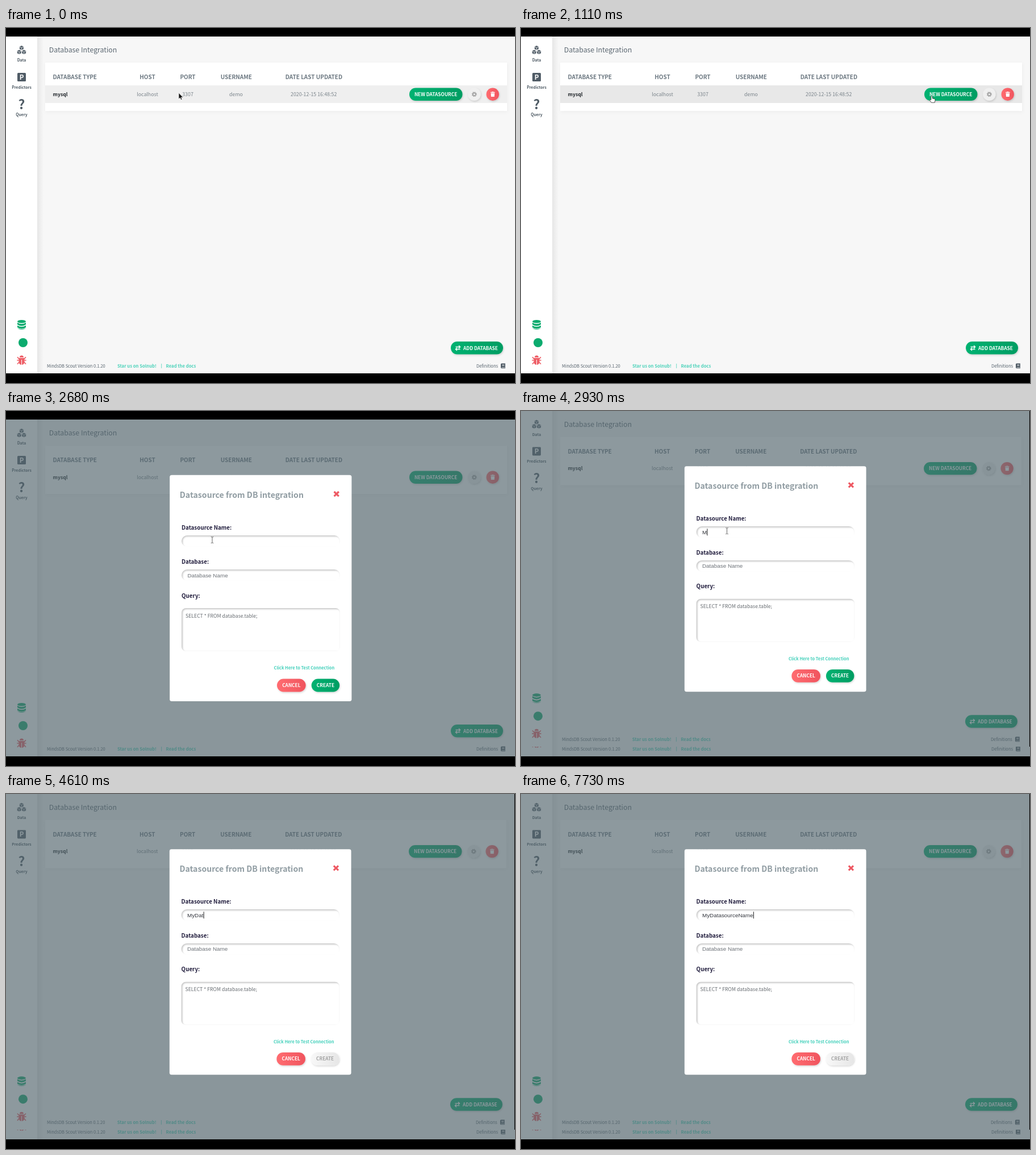
These frames come from a looping animation (896 px wide and 625 px high, 8 s). An HTML page:

```html
<!DOCTYPE html>
<html lang="en">
<head>
<meta charset="utf-8">
<title>Database Integration</title>
<style>
  html, body { margin: 0; width: 100%; height: 100%; overflow: hidden; background: #000; }
  svg { display: block; width: 896px; height: 625px; }
  text { font-family: "Noto Sans CJK SC", "Noto Sans CJK JP", "Noto Sans CJK", sans-serif; white-space: pre; }
  .b { font-weight: 700; }
  .mid { text-anchor: middle; }
  .head { font-size: 10px; fill: #6b7780; }
  .cell { font-size: 8.8px; fill: #7b848b; }
  .nav { font-size: 6.8px; fill: #4c5862; }
  .foot { font-size: 7.5px; fill: #57636d; }
  .link { font-size: 7.7px; fill: #4fd3bb; }
  .btn { font-size: 8.3px; fill: #fff; }
  .label { font-size: 9.83px; fill: #211d3d; }
  .field { font-family: "Liberation Sans", Arial, sans-serif; font-size: 9.87px; }
  .icon { fill: #505c66; }
</style>
</head>
<body>
<svg viewBox="0 0 896 625">
  <defs>
    <linearGradient id="green"><stop stop-color="#00b271"/><stop offset="1" stop-color="#009d63"/></linearGradient>
    <linearGradient id="red"><stop stop-color="#ff6c70"/><stop offset="1" stop-color="#f0555f"/></linearGradient>
    <linearGradient id="grey"><stop stop-color="#f8f8f8"/><stop offset="1" stop-color="#e6e6e6"/></linearGradient>
    <linearGradient id="side"><stop stop-color="#e6e6e6"/><stop offset="1" stop-color="#f7f7f7"/></linearGradient>
    <filter id="blur" x="-20%" y="-50%" width="140%" height="200%"><feGaussianBlur stdDeviation="1.5"/></filter>
    <filter id="drop" x="-20%" y="-40%" width="150%" height="200%">
      <feDropShadow dx="1" dy="1.5" stdDeviation="1.5" flood-color="#000" flood-opacity=".17"/>
    </filter>
    <filter id="soft" x="-5%" y="-20%" width="110%" height="150%">
      <feDropShadow dx="1" dy="2" stdDeviation="3" flood-color="#000" flood-opacity=".04"/>
    </filter>
    <clipPath id="stage"><rect y="15" width="896" height="593"/></clipPath>
    <clipPath id="strip"><rect y="591" width="896" height="17"/></clipPath>
    <clipPath id="nameBox"><rect x="309" y="219" width="279" height="20" rx="10"/></clipPath>
    <clipPath id="dbBox"><rect x="309" y="279" width="279" height="20" rx="10"/></clipPath>
    <clipPath id="queryBox"><rect x="309" y="347" width="279" height="76" rx="8"/></clipPath>
    <path id="cube" d="M0-4.4L3.8-2.6V2L0 4L-3.8 2V-2.6Z"/>
  </defs>

  <rect width="896" height="625"/>

  <g id="shift">
    <g id="page" clip-path="url(#stage)">
      <rect y="15" width="896" height="593" fill="#f7f7f7"/>
      <rect x="55" y="15" width="11" height="593" fill="url(#side)"/>
      <rect y="15" width="55" height="593" fill="#fff"/>

      <!-- side bar -->
      <g class="icon" stroke="#fff" stroke-width=".7">
        <use href="#cube" x="27.4" y="35.2"/><use href="#cube" x="23.2" y="42.6"/><use href="#cube" x="31.6" y="42.6"/>
        <path fill="none" d="M23.8 33.2L27.4 34.8L31 33.2M27.4 34.8V39M19.6 40.6L23.2 42.2L26.8 40.6M23.2 42.2V46.4M28 40.6L31.6 42.2L35.2 40.6M31.6 42.2V46.4"/>
      </g>
      <text class="nav b mid" x="27.5" y="59.4">Data</text>
      <rect class="icon" x="20" y="79" width="15" height="15" rx="1.5"/>
      <text class="b mid" x="27.6" y="90.7" font-size="11.5" fill="#fff">P</text>
      <text class="nav b mid" x="27.5" y="107">Predictors</text>
      <text class="icon b mid" x="27.5" y="142.8" font-size="23">?</text>
      <text class="nav b mid" x="27.5" y="155">Query</text>
      <g fill="#0bab6e">
        <ellipse cx="27.5" cy="516.8" rx="7.5" ry="2.8"/>
        <path id="disc" d="M20 518.8Q27.5 523.4 35 518.8V522Q27.5 527 20 522Z"/>
        <use href="#disc" y="5"/>
        <path d="M20 528.6Q27.5 532 35 528.6V528.8Q27.5 533.4 20 528.8Z"/>
        <circle cx="30" cy="554" r="8"/>
      </g>
      <g fill="none" stroke="#ee5f67" stroke-width="1.6">
        <path d="M22.4 585H19.4M32.6 585H35.6M22.8 582.4L20 579.4M32.2 582.4L35 579.4M22.8 588.4L20 591.8M32.2 588.4L35 591.8"/>
        <path fill="#ee5f67" stroke="none" d="M24 580A3.5 3.5 0 0 1 31 580ZM22.4 581H32.6V588Q32 592.4 28 593V584H27V593Q23 592.4 22.4 588Z"/>
      </g>

      <!-- table -->
      <text x="75.8" y="43" font-size="12.3" fill="#5c6872">Database Integration</text>
      <rect x="69" y="61" width="813" height="85" fill="#fff" filter="url(#soft)"/>
      <rect id="row" x="69" y="101" width="813" height="31"/>
      <g class="head b">
        <text x="82.6" y="90.2">DATABASE TYPE</text>
        <g class="mid">
          <text x="249" y="90.2">HOST</text>
          <text x="320" y="90.2">PORT</text>
          <text x="405.3" y="90.2">USERNAME</text>
          <text x="542" y="90.2">DATE LAST UPDATED</text>
        </g>
      </g>
      <text class="b" x="82.6" y="120" font-size="8.7" fill="#1f2429">mysql</text>
      <g class="cell mid">
        <text x="249" y="120">localhost</text>
        <text x="320" y="120">3307</text>
        <text x="405" y="120">demo</text>
        <text x="541.7" y="120">2020-12-15 16:48:52</text>
      </g>
      <g filter="url(#drop)">
        <rect x="710" y="105.5" width="93.5" height="22.5" rx="11.2" fill="url(#green)"/>
        <circle cx="824.3" cy="116.7" r="11.2" fill="#f0f0f0"/>
        <circle cx="856.7" cy="116.7" r="11.2" fill="url(#red)"/>
        <rect x="783" y="552" width="92" height="22.5" rx="11.2" fill="url(#green)"/>
      </g>
      <text class="btn b mid" x="756.6" y="119.9">NEW DATASOURCE</text>
      <g fill="none" stroke="#a5a5a5">
        <circle cx="824.3" cy="116.7" r="2.5" stroke-width="1.9"/>
        <circle cx="824.3" cy="116.7" r="3.8" stroke-width="1.5" stroke-dasharray="1.5 1.484"/>
      </g>
      <path fill="#fff" d="M853 112.8H855.2L855.8 112H857.8L858.4 112.8H860.6V114H853ZM853.5 114.8H860.1L859.7 121H853.9Z"/>
      <path fill="none" stroke="#fff" stroke-width="1.3" d="M791.5 561.5H799M797 559L799.6 561.5L797 564M799.5 565.5H792M794 563L791.4 565.5L794 568"/>
      <text class="btn b mid" x="835.4" y="566.7">ADD DATABASE</text>

      <!-- footer -->
      <text class="foot" x="72" y="597.7">MindsDB Scout Version 0.1.20</text>
      <text class="link b" x="196" y="597.7">Star us on Solnub!</text>
      <path stroke="#4fd3bb" stroke-width=".8" d="M273.7 591V599"/>
      <text class="link b" x="281.6" y="597.7">Read the docs</text>
      <text class="foot" x="828" y="597.7">Definitions</text>
      <path fill="#4c5862" d="M872.6 590.4H878.8V599.2H872.6Q871 599.2 871 597.6V592Q871 590.4 872.6 590.4Z"/>
      <path stroke="#f7f7f7" stroke-width=".8" d="M873.2 592.8H877.2M873.2 594.4H877.2M872.4 597.8H878.2"/>

      <!-- dialog -->
      <g id="dialog">
        <rect y="15" width="896" height="593" fill="#53656c" fill-opacity=".66"/>
        <rect x="288.2" y="112.8" width="320.2" height="398.2" rx="3.5" fill="#fff"/>
        <text class="b" x="305.8" y="152.7" font-size="14.1" fill="#919da3">Datasource from DB integration</text>
        <path stroke="#ee5a64" stroke-width="3.2" d="M577.6 142L585.8 150.2M585.8 142L577.6 150.2"/>
        <g class="label b">
          <text x="309" y="209.1">Datasource Name:</text>
          <text x="309" y="268.8">Database:</text>
          <text x="309" y="328.5">Query:</text>
        </g>
        <g fill="none" stroke="#b4b4b4" stroke-width="3">
          <g clip-path="url(#nameBox)"><rect x="309" y="219" width="282" height="24" rx="10" filter="url(#blur)"/></g>
          <g clip-path="url(#dbBox)"><rect x="309" y="279" width="282" height="24" rx="10" filter="url(#blur)"/></g>
          <g clip-path="url(#queryBox)"><rect x="309" y="347" width="282" height="79" rx="8" filter="url(#blur)"/></g>
        </g>
        <text id="name" class="field" x="319.4" y="232.7" fill="#35383f"></text>
        <rect id="caret" y="223.2" width="1" height="12" fill="#222"/>
        <text class="field" x="319.4" y="292.6" fill="#6c7177">Database Name</text>
        <text x="316" y="363.6" font-size="8.7" fill="#666b70">SELECT * FROM database.table;</text>
        <text class="b" x="471.5" y="455.4" font-size="7.45" fill="#43d0bb">Click Here to Test Connection</text>
        <g filter="url(#drop)">
          <rect x="477" y="471.6" width="50.7" height="22.8" rx="11.4" fill="url(#red)"/>
          <rect id="create" x="537.7" y="471.6" width="49.5" height="22.8" rx="11.4"/>
        </g>
        <text class="btn b mid" x="502.3" y="486.1">CANCEL</text>
        <text id="createText" class="btn b mid" x="562.4" y="486.1">CREATE</text>
      </g>

      <!-- pointers -->
      <path id="arrow" fill="#111" stroke="#fff" stroke-width=".7" d="M0 0V10.8L2.5 8.6L4.2 12.3L6 11.5L4.4 7.9H7.8Z"/>
      <path id="hand" fill="#fff" stroke="#333" stroke-width=".8" d="M-1.2 1Q0-1 1.2 1V4.6L5 5.4Q6.3 6 6 8L5.2 12H-.6L-3.6 7.8Q-3.6 6-1.2 7.2Z"/>
      <path id="beam" fill="none" stroke="#555" stroke-width=".9" d="M-2.2-5.5Q0-5.5 0-4.5Q0-5.5 2.2-5.5M0-4.5V4.5M-2.2 5.5Q0 5.5 0 4.5Q0 5.5 2.2 5.5"/>
    </g>
  </g>
  <g id="under" clip-path="url(#strip)"><use href="#page"/></g>
</svg>

<script>
const LOOP = 8000, OPEN = 1270, SCROLL = 2930, DISABLE = 3030;
const $ = id => document.getElementById(id);
const show = (id, on) => $(id).style.display = on ? "" : "none";

// [start, typed text, caret visible]
const typing = [
  [0, "", 0], [2040, "", 1], [2680, "", 0],
  [2930, "M", 1], [3230, "My", 1], [3720, "MyD", 1], [4320, "MyDa", 1],
  [4610, "MyDat", 1], [4730, "MyData", 1], [4910, "MyDataSo", 1],
  [5400, "MyDataS", 1], [5500, "MyData", 1], [5610, "MyData", 0], [6080, "MyData", 1],
  [6280, "MyDatas", 1], [6370, "MyDataso", 1], [6590, "MyDatasou", 1],
  [6670, "MyDatasour", 1], [6850, "MyDatasourc", 1], [7060, "MyDatasource", 1],
  [7340, "MyDatasourceN", 1], [7590, "MyDatasourceNa", 1],
  [7660, "MyDatasourceNam", 1], [7730, "MyDatasourceName", 1]
];

// [start, pointer, x, y]
const pointer = [[0, "arrow", 304, 114.3]];
for (let i = 1; i <= 8; i++) {
  const p = i / 8, x = 304 + 419 * p * p * (3 - 2 * p);
  pointer.push([300 + (i - 1) * 87, x > 710 ? "hand" : "arrow", x, 114.3 + 5 * p]);
}
pointer.push(
  [1620, "arrow", 620, 150], [1710, "arrow", 480, 200],
  [1800, "arrow", 390, 226], [1890, "beam", 363, 227], [4160, "", 0, 0]
);

const at = (steps, t) => steps.findLast(s => s[0] <= t);

function draw(t) {
  const open = t >= OPEN, moved = t >= SCROLL, off = t >= DISABLE;
  $("row").setAttribute("fill", open ? "#fff" : t < 130 ? "#efefef" : t < 300 ? "#ededed" : "#e8e8e8");
  show("dialog", open);
  $("shift").setAttribute("transform", moved ? "matrix(.9987 0 0 .9973 0 -15.3)" : "");
  show("under", moved);

  $("create").setAttribute("fill", off ? "url(#grey)" : "url(#green)");
  $("createText").style.fill = off ? "#a3a3a3" : "#fff";

  const [, text, caret] = at(typing, t);
  $("name").textContent = text;
  show("caret", caret);
  if (open) $("caret").setAttribute("x", 319.6 + (text ? $("name").getComputedTextLength() : 0));

  const [, kind, x, y] = at(pointer, t);
  for (const id of ["arrow", "hand", "beam"]) show(id, id === kind);
  if (kind) $(kind).setAttribute("transform", `translate(${x} ${y})`);
}

const start = performance.now();
function tick() {
  draw((performance.now() - start) % LOOP);
  requestAnimationFrame(tick);
}
tick();
</script>
</body>
</html>
```
